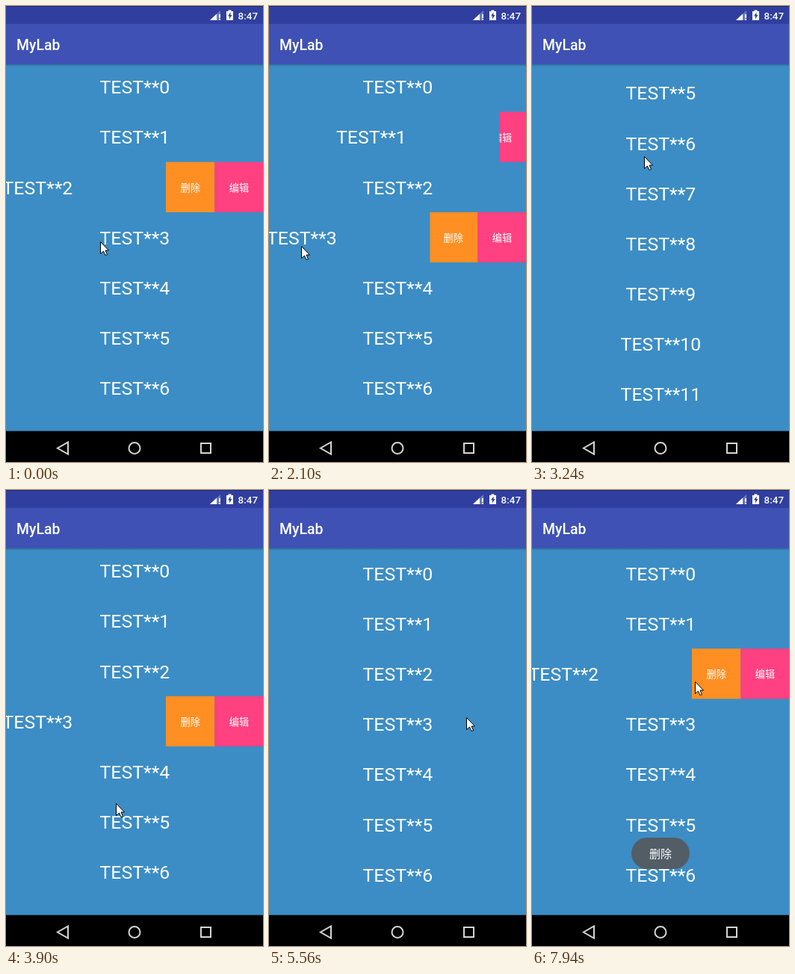
Animation, 344 px wide and 610 px high, one loop 8000 ms. Source, as an HTML page with a canvas:

```html
<!DOCTYPE html>
<html>
<head>
<meta charset="utf-8">
<style>
  html, body { margin: 0; width: 344px; height: 610px; overflow: hidden; background: #000; }
  canvas { display: block; }
</style>
</head>
<body>
<canvas id="stage" width="344" height="610"></canvas>
<script>
const ctx = document.getElementById('stage').getContext('2d');
const LOOP = 8000, STEP = 120;
const WIDTH = 344, LIST_TOP = 77.9, LIST_BOTTOM = 568.6, ROW = 67.15, ROWS = 14;
const CENTER = 172.4, BUTTON = 65.3, OPEN = 130;
const LATIN = 'Roboto, sans-serif';
const CJK = '"Noto Sans CJK SC", "Noto Sans CJK", sans-serif';

// Each gesture: [first step, last step, ...target].
const pointer = {
  start: [126, 315],
  moves: [
    [120, 390, 55, 350], [510, 510, 124, 345],                        // swipe row 3 open
    [660, 930, 187, 177], [1080, 1080, 97, 192],                      // swipe row 1
    [1200, 1440, 170, 335], [1590, 2100, 43, 321],                    // swipe row 3 again
    [2220, 2580, 150, 406], [2730, 3240, 150, 201],                   // fling the list up
    [3360, 3510, 153, 229], [3660, 3900, 147, 419],                   // and back down
    [4050, 4170, 175, 382], [4320, 4560, 311, 320],
    [4680, 4920, 195, 312], [5200, 5560, 264, 304],                   // close row 3
    [5680, 5950, 234, 249], [6100, 6220, 51, 280],                    // swipe row 2 open
    [6370, 6760, 233, 254], [6910, 7030, 244, 253], [7940, 7940, 218, 256]
  ]
};
const scroll = { start: [3.5], moves: [[2730, 3360, 334.8], [3660, 3900, 3.5], [4050, 4170, 0]] };
const toast = { start: [0], moves: [[7430, 7670, 1]] };
const slides = {
  1: { start: [0], moves: [[1080, 1080, 55], [1200, 1200, 35.5], [2220, 2340, 0]] },
  2: { start: [OPEN], moves: [[120, 390, 0], [6100, 6220, OPEN]] },
  3: { start: [0], moves: [[240, 510, OPEN], [1200, 1440, 0], [1590, 2100, 128.5],
                           [2220, 2220, OPEN], [5200, 5440, 0]] }
};

const easeOut = k => 1 - (1 - k) ** 2.5;

// Value of a track at time t, moving in discrete steps like a screen recording.
function glide({ start, moves }, t, ease = k => k) {
  let value = start;
  for (const [from, to, ...target] of moves) {
    if (t < from) break;
    const steps = Math.round((to - from) / STEP) + 1;
    const k = ease(Math.min(1, (Math.floor((t - from) / STEP) + 1) / steps));
    value = value.map((v, i) => v + (target[i] - v) * k);
  }
  return value;
}

function rect(color, x, y, w, h) {
  ctx.fillStyle = color;
  ctx.fillRect(x, y, w, h);
}

function text(str, x, y, font, align = 'center') {
  ctx.font = font;
  ctx.textAlign = align;
  ctx.fillStyle = '#fff';
  ctx.fillText(str, x, y);
}

function path(d, fill, stroke, width = 1) {
  const p = new Path2D(d);
  if (fill) { ctx.fillStyle = fill; ctx.fill(p); }
  if (stroke) { ctx.strokeStyle = stroke; ctx.lineWidth = width; ctx.stroke(p); }
}

function drawButton(label, color, x, top) {
  rect(color, x, top, BUTTON, ROW);
  text(label, x + BUTTON / 2, top + ROW / 2 + 5.7, '500 13.2px ' + CJK);
}

// The buttons stay in place; the row slides left and uncovers them.
function drawRow(index, top, slide) {
  if (slide > 0) {
    ctx.save();
    ctx.beginPath();
    ctx.rect(WIDTH - slide, top - 1, slide, ROW + 2);
    ctx.clip();
    drawButton('删除', '#ff8f22', WIDTH - OPEN, top);
    drawButton('编辑', '#ff4081', WIDTH - OPEN + BUTTON, top);
    ctx.restore();
  }
  text('TEST**' + index, CENTER - slide, top + ROW / 2 + 9.3, '24.8px ' + LATIN);
}

function drawBars() {
  const shade = ctx.createLinearGradient(0, LIST_TOP, 0, LIST_TOP + 3);
  shade.addColorStop(0, 'rgba(0,0,0,.25)');
  shade.addColorStop(1, 'rgba(0,0,0,0)');
  rect(shade, 0, LIST_TOP, WIDTH, 3);
  rect('#3f51b5', 0, 24, WIDTH, LIST_TOP - 24);
  rect('#303f9f', 0, 0, WIDTH, 24);
  rect('#202a6b', 0, 0, WIDTH, 1);
  text('MyLab', 14, 59, '500 19.4px ' + LATIN, 'left');
  text('8:47', 337, 18, '500 13.4px ' + LATIN, 'right');
  // signal and battery
  path('M273 19L287 6V19Z', 'rgba(255,255,255,.3)');
  path('M273 19L282 10.5V19Z', '#fff');
  path('M285 11h2v5h-2zM285 17h2v2h-2z', '#fff');
  path('M295 7h2.5V5.5h4V7h2.5v12h-9z', '#fff');
  path('M300.5 8.5l-3.5 5h2v4l3.5-5.5h-2z', '#303f9f');

  rect('#000', 0, LIST_BOTTOM, WIDTH, 610 - LIST_BOTTOM);
  path('M83 583.5V599.5L69 591.5Z', null, '#d4d4d4', 2);
  path('M179.5 591.5a7.5 7.5 0 1 0-15 0a7.5 7.5 0 1 0 15 0Z', null, '#d4d4d4', 2);
  path('M261 585h13v13h-13Z', null, '#d4d4d4', 2);
}

function drawToast(alpha) {
  ctx.globalAlpha = alpha;
  path('M154 465h36a21 21 0 0 1 0 42h-36a21 21 0 0 1 0-42Z', '#535d65');
  text('删除', 172, 491.5, '15px ' + CJK);
  ctx.globalAlpha = 1;
}

function drawPointer(x, y) {
  ctx.save();
  ctx.translate(Math.round(x) + .5, Math.round(y) + .5);
  path('M0 0V16L4 12.5L6.5 18L9 17L6.5 11.5H11Z', '#fff', '#000');
  ctx.restore();
}

function frame() {
  const t = performance.now() % LOOP;
  const [offset] = glide(scroll, t, easeOut), [alpha] = glide(toast, t);
  rect('#3c8dc5', 0, 0, WIDTH, 610);
  for (let i = 0; i < ROWS; i++) {
    const [slide] = slides[i] ? glide(slides[i], t) : [0];
    drawRow(i, LIST_TOP + i * ROW - offset, slide);
  }
  drawBars();
  if (alpha > 0) drawToast(alpha);
  drawPointer(...glide(pointer, t));
  requestAnimationFrame(frame);
}
frame();
</script>
</body>
</html>
```
